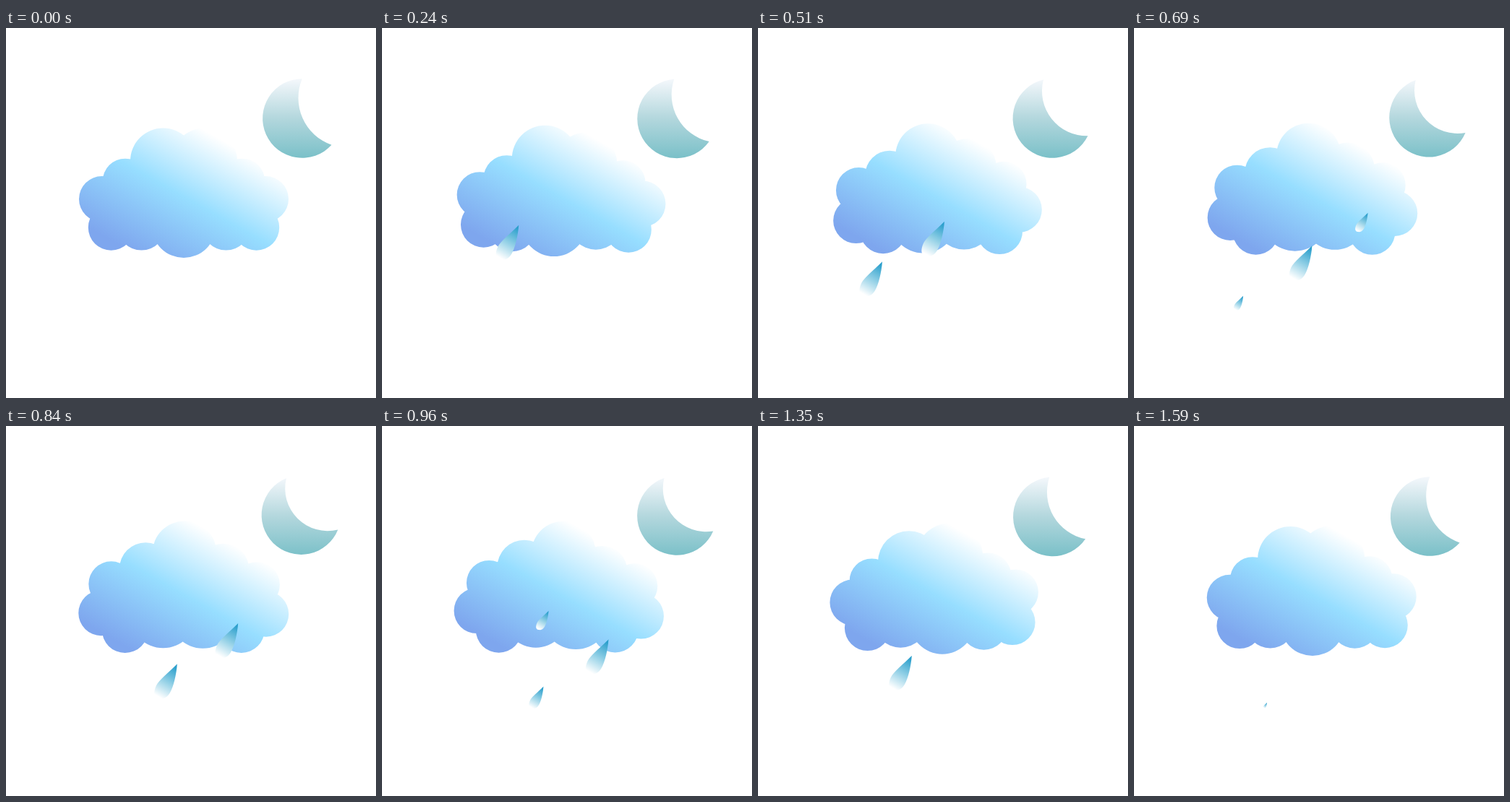
An HTML page with a canvas for the animation above (1620 ms loop, 512 by 512 pixels).

```html
<!DOCTYPE html>
<html lang="en">
<head>
<meta charset="utf-8">
<title>Rainy night cloud</title>
<style>
  html, body { margin: 0; width: 100%; height: 100%; overflow: hidden; background: #fff; }
  canvas { display: block; }
</style>
</head>
<body>
<canvas id="stage" width="512" height="512"></canvas>
<script>
const ctx = document.getElementById('stage').getContext('2d');
const LOOP = 1620, STEP = 30, AXIS = 246;

function gradient(x0, y0, x1, y1, ...stops) {
  const g = ctx.createLinearGradient(x0, y0, x1, y1);
  for (const [at, color] of stops) g.addColorStop(at, color);
  return g;
}
const mix = (a, b, k) => a + (b - a) * k;

const cloudFill = gradient(193.6, 321, 290, 150, [0, '#7ea6ee'], [0.52, '#97deff'], [1, '#fff']);
const moonFill = gradient(0, 70, 0, 180, [0, '#f5f8fc'], [0.5, '#b3d7dd'], [1, '#7ac0c8']);
const dropFill = gradient(14, -20, -10, 21, [0, '#2b9fcc'], [0.5, '#92d0e6'], [1, '#fff']);

// Puffs [x, y, radius] up the left side; the right side mirrors them.
const left = [
  [246, 273.5, 44.5], [218.5, 261, 46.5], [187.5, 273.5, 34], [165.5, 282, 32],
  [145.5, 276, 31.7], [132, 259.5, 31.5], [132.7, 236.7, 31.7], [145, 219, 31.3],
  [165, 212, 31.3], [192.3, 198, 36], [217.5, 184, 45.5], [246, 176, 44.5]
];
const right = left.slice(1, -1).reverse().map(([x, y, r]) => [2 * AXIS - x, y, r]);
const ring = [...left, ...right];

// Catmull-Rom point on the closed ring
function puffAt(pos) {
  const i = Math.floor(pos), k = pos - i;
  const [a, b, c, d] = [-1, 0, 1, 2].map(o => ring[(i + o + ring.length) % ring.length]);
  return b.map((v, n) => v + k / 2 * (c[n] - a[n]
    + k * (2 * a[n] - 5 * v + 4 * c[n] - d[n] + k * (3 * (v - c[n]) + d[n] - a[n]))));
}

function drawCloud(t) {
  const puffs = [];
  for (let i = 0; i < ring.length; i += 2) puffs.push(puffAt(i + 2 * t / LOOP));
  ctx.beginPath();
  for (const [x, y] of puffs) ctx.lineTo(x, y);
  ctx.closePath();
  for (const [x, y, r] of puffs) {
    ctx.moveTo(x + r, y);
    ctx.arc(x, y, r, 0, 2 * Math.PI);
  }
  ctx.fillStyle = cloudFill;
  ctx.fill();
}

function drawMoon(t) {
  const k = 1 - Math.abs(1 - 2 * t / LOOP);
  const e = mix(k, (1 - Math.cos(Math.PI * k)) / 2, 0.5);
  const top = `${mix(409.8, 387.5, e)} ${mix(70.2, 72.3, e)}`;
  const tail = `${mix(450.5, 459.5, e)} ${mix(161.8, 143, e)}`;
  const inner = mix(69, 58.5, e);
  ctx.fillStyle = moonFill;
  ctx.fill(new Path2D(`M${top}A54.8 54.8 0 1 0 ${tail}A${inner} ${inner} 0 0 1 ${top}Z`));
}

const dropShape = new Path2D(
  'M16-24C15-10 11 8 6 16C2 23-4 25-9 24C-17 23-17 15-13 6C-9-2 2-10 16-24Z');
const drops = [[25, 187], [322, 254], [624, 319], [894, 226]]; // [start, x]
const LIFE = 715, POP = 120;

function drawDrop(age, x) {
  const scale = Math.min(1, age / POP, (LIFE - age) / POP);
  if (scale <= 0) return;
  ctx.save();
  ctx.translate(x - 0.064 * age, 256.5 + 0.187 * age);
  ctx.scale(scale, scale);
  ctx.fillStyle = dropFill;
  ctx.fill(dropShape);
  ctx.restore();
}

function draw() {
  const t = Math.floor(performance.now() % LOOP / STEP) * STEP;
  ctx.fillStyle = '#fff';
  ctx.fillRect(0, 0, 512, 512);
  drawMoon(t);
  drawCloud(t);
  for (const [start, x] of drops) drawDrop(t - start, x);
  requestAnimationFrame(draw);
}
draw();
</script>
</body>
</html>
```
